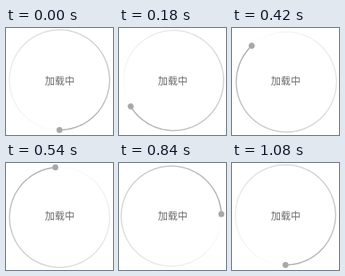
Recreate the animation shown at these times as an HTML page. Size 134x134 px, loop 1.14 s.

```html
<!DOCTYPE html>
<html lang="zh-CN">
<head>
<meta charset="utf-8">
<style>
  html, body { margin: 0; width: 100%; height: 100%; overflow: hidden; background: #fff; }
  svg { display: block; width: 100vw; height: 100vh; }
  text { font: 12.4px "Noto Sans CJK SC", "Noto Sans CJK", sans-serif; fill: #6a6a6a; text-anchor: middle; }
</style>
</head>
<body>
<svg viewBox="0 0 134 134">
  <g id="spinner">
    <g id="trail" fill="none" stroke-width="1.5"></g>
    <circle cx="67" cy="127.7" r="3.7" fill="#a8a8a8"/>
  </g>
  <text x="67.3" y="71.2">加载中</text>
</svg>
<script>
const LOOP = 1140, STEP = 60;
const PIVOT = { x: 67, y: 66.5 };
const RING = { x: 67, y: 65, r: 62.7 };
const SEGMENTS = 120;
// [step, degrees]: nearly uniform turn with a slight lag and a final jump
const TURN = [[0, 0], [3, 58.8], [7, 136.3], [11, 214], [14, 267.7], [17, 330.7], [18, 360]];

const spinner = document.getElementById("spinner");
const trail = document.getElementById("trail");

function ringPoint(degrees) {
  const a = degrees * Math.PI / 180;
  return `${RING.x + RING.r * Math.sin(a)} ${RING.y + RING.r * Math.cos(a)}`;
}

// The tail runs from the dot backwards round the ring, fading to white.
function buildTrail() {
  const span = 360 / SEGMENTS;
  for (let i = 0; i < SEGMENTS; i++) {
    const shade = Math.round(168 + 87 * Math.pow(i / SEGMENTS, 0.8));
    const arc = document.createElementNS("http://www.w3.org/2000/svg", "path");
    const end = (i + 1) * span + (i < SEGMENTS - 1 ? 0.3 : 0);
    arc.setAttribute("d", `M${ringPoint(i * span)}A${RING.r} ${RING.r} 0 0 0 ${ringPoint(end)}`);
    arc.setAttribute("stroke", `rgb(${shade},${shade},${shade})`);
    trail.append(arc);
  }
}

function angleAt(step) {
  const i = Math.max(1, TURN.findIndex(([s]) => s >= step));
  const [s0, a0] = TURN[i - 1], [s1, a1] = TURN[i];
  return a0 + (a1 - a0) * (step - s0) / (s1 - s0);
}

function draw(time) {
  const step = Math.floor((time % LOOP) / STEP);
  spinner.setAttribute("transform", `rotate(${angleAt(step)} ${PIVOT.x} ${PIVOT.y})`);
}

function tick() {
  draw(performance.now() - start);
  requestAnimationFrame(tick);
}

buildTrail();
const start = performance.now();
draw(0);
requestAnimationFrame(tick);
</script>
</body>
</html>
```
